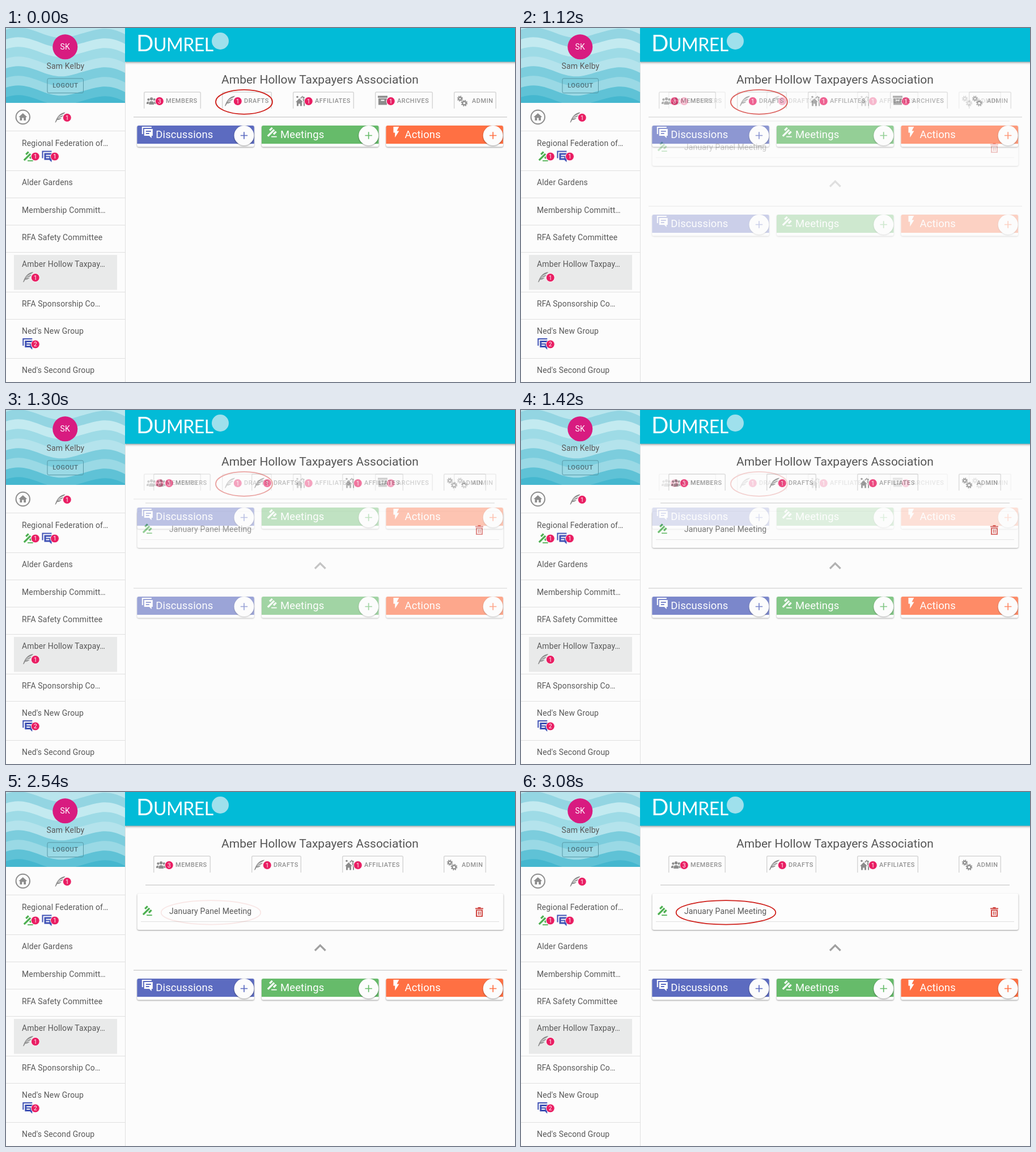
Animation of 898 by 624 pixels, one loop 5080 ms. Source, as an HTML page:

```html
<!DOCTYPE html>
<html lang="en">
<head>
<meta charset="utf-8">
<title>Group drafts</title>
<style>
html, body { margin: 0; width: 100%; height: 100%; overflow: hidden; background: #fcfcfc; }
svg { display: block; width: 898px; height: 624px; font: 14px Roboto, sans-serif; }
text { fill: #595959; letter-spacing: .14px; white-space: pre; }
.mid { text-anchor: middle; }
.caps { font-size: 11px; font-weight: 500; letter-spacing: .5px; fill: #929292; }
.title { font-size: 21px; letter-spacing: 0; fill: #555; }
.head { font-size: 18.5px; letter-spacing: .1px; fill: #fff; }
.count { font-size: 10px; letter-spacing: 0; fill: #fff; text-anchor: middle; }
.brand { font: 40px Lato, sans-serif; letter-spacing: -.5px; fill: #fff; }
.raised { filter: drop-shadow(0 1px 1.2px #0006); }
.ring { fill: none; stroke: #cf211c; stroke-width: 1.8; }
.rule { stroke: #d2d2d2; stroke-width: 1.5; }
.thin { stroke: #e0e0e0; }
</style>
</head>
<body>
<svg id="stage" viewBox="0 0 898 624"></svg>
<script>
const GRAY = '#8c8c8c', INDIGO = '#3f51b5', GREEN = '#4caf50', PINK = '#e91e63';

const text = (x, y, s, cls = '') => `<text x="${x}" y="${y}" class="${cls}">${s}</text>`;
const line = (x1, x2, y, cls) => `<path d="M${x1} ${y}H${x2}" class="${cls}"/>`;
const at = (x, y, body, scale = 1) => `<g transform="translate(${x} ${y}) scale(${scale})">${body}</g>`;
const shape = d => `<path fill-rule="evenodd" d="${d}"/>`;
const dot = (x, y, r) => `<circle cx="${x}" cy="${y}" r="${r}"/>`;
const gear = (x, y, r) => `<g transform="translate(${x} ${y})" fill="none" stroke="${GRAY}">
  <circle r="${r - 1.7}" stroke-width="2"/>
  <circle r="${r}" stroke-width="2" stroke-dasharray="${r * Math.PI / 8}"/></g>`;

// Icons are drawn from their top left corner, about 18 px wide.
const icons = {
  feather: shape(`M0 18C3 9 8 1 18 0C17 2 15 3.5 12.5 4.3C9 5.5 6 8 4.3 11C7 8 11 6 15 5.2
    C14 7 12 8.2 10 8.8C8 9.4 6 10.6 4.7 12.2C7 10.8 9 10.2 11.5 10C9.5 12.6 7 13.6 4 13.6L1.3 18Z`),
  chat: shape('M0 0h17v2H2v11H0zM4 4h15v12h-2v4l-4-4H4zM7 7v2h9V7zM7 11v2h6v-2z'),
  gavel: `<g transform="translate(18.5 0) scale(-.8 .8)">${shape(`M1 21h12v2H1zM5.2 8l2.9-2.8 14.1 14.2-2.8 2.8z
    M12.3 1 18 6.7l-2.8 2.8-5.7-5.7zM3.8 9.5l5.7 5.6-2.8 2.9L1 12.3z`)}</g>`,
  bolt: shape('M0 0v10.5h2.8V19L10 7.6H6L9.8 0z'),
  people: dot(3.4, 4.2, 2.1) + dot(13.8, 4.2, 2.1) + dot(8.6, 3, 2.7) +
    shape('M0 12V10Q0 7.5 4 7.5L3.5 12zM17 12V10Q17 7.5 13 7.5L13.7 12zM4.3 13V10.5Q4.5 7 8.6 7T13 10.5V13z'),
  houses: dot(3, 2, 1.8) + dot(14, 3.4, 1.8) +
    shape('M0 11 6.5 4.5 13 11h-2v7H8v-4H5v4H2v-7zM8 4l4-4 1.2 1.2-4 4zM12 6h4l1.5 5H16v7h-2v-8z'),
  box: shape('M0 0h17v3.5H0zM1 4.5h15V16H1zM5.5 7v2h6V7z'),
  gears: gear(5, 5, 4.2) + gear(12.5, 13, 4.8),
  home: shape('M10 20v-6h4v6h5v-8h3L12 3 2 12h3v8z'),
  trash: shape('M4.5 0h5v1.5H14v2H0v-2h4.5zM1 4.5h12V17H1zM3 6.2v9h8v-9zM4.8 7.5h1.5v6.3H4.8zM7.8 7.5h1.5v6.3H7.8z')
};
const icon = (name, x, y, color = GRAY, scale = 1) => `<g fill="${color}">${at(x, y, icons[name], scale)}</g>`;
const badge = (x, y, n) =>
  `<circle cx="${x}" cy="${y}" r="7.5" fill="${PINK}" stroke="#fff"/>` + text(x, y + 3.6, n, 'count');

const TABS = {
  MEMBERS: [101, 'people', 3],
  DRAFTS: [88, 'feather', 1],
  AFFILIATES: [108, 'houses', 1],
  ARCHIVES: [102, 'box', 1],
  ADMIN: [75, 'gears', 0]
};
function tab(name, x) {
  const [w, glyph, n] = TABS[name];
  return `<path d="M${x + .7} 142V115q0-2 2-2H${x + w - 2.7}q2 0 2 2V142" fill="none" stroke="#d6d6d6" stroke-width="1.5"/>` +
    icon(glyph, x + (n ? 5 : 6), glyph == 'people' ? 122 : 119.5) +
    (n ? badge(x + 27.8, 129, n) : '') + text(x + (n ? 39 : 32), 132, name, 'caps');
}
const tabs = places => Object.entries(places).map(([name, x]) => tab(name, x)).join('');

const card = (x, y, name, glyph, color, dx) => at(x, y, `
  <rect width="206.5" height="37.5" rx="3" fill="#fdfdfd" class="raised"/>
  <path d="M0 32V3q0-3 3-3H203.5q3 0 3 3V32z" fill="${color}"/>
  ${icon(glyph, dx, 2, '#fff')}${text(33, 22, name, 'head')}
  <circle cx="188.7" cy="17.5" r="17.5" fill="#fcfcfc" class="raised"/>
  <path d="M182.5 17.5h12.4M188.7 11.3v12.4" stroke="${color}" stroke-width="1.7"/>`);
const cards = y => card(231.3, y, 'Discussions', 'chat', '#5c6bc0', 8.5) +
  card(451, y, 'Meetings', 'gavel', '#66bb6a', 9) + card(670.5, y, 'Actions', 'bolt', '#ff7043', 13);

const before = tabs({ MEMBERS: 243, DRAFTS: 381, AFFILIATES: 506, ARCHIVES: 651, ADMIN: 790 }) +
  line(225, 884, 157, 'rule') + cards(172) +
  '<ellipse cx="420" cy="130.3" rx="50" ry="21.5" class="ring"/>';

const after = '<path d="M211 60H898V624H211z" fill="#fcfcfc"/>' +
  tabs({ MEMBERS: 260, DRAFTS: 433, AFFILIATES: 593, ADMIN: 772 }) +
  line(246, 862, 164, 'rule') +
  '<rect x="231.5" y="179" width="646" height="64" rx="3" fill="#fdfdfd" class="raised"/>' +
  icon('gavel', 240, 199.5, GREEN) + text(288, 215, 'January Panel Meeting') +
  icon('trash', 828, 203, '#cf4540') + line(238, 870, 228.5, 'thin') +
  '<path d="M545 279.5 554.3 270.3 563.6 279.5" fill="none" stroke="#a0a0a0" stroke-width="3.2"/>' +
  line(225, 884, 314.3, 'rule') + cards(329);

const header = `<rect x="205" y="-5" width="700" height="64.5" fill="#02bbd7" style="filter:drop-shadow(0 1px 2px #0007)"/>` +
  text(230, 41, 'D<tspan font-size="32">UMREL</tspan>', 'brand') +
  '<circle cx="378" cy="23" r="15" fill="#9fe0ec"/>' +
  text(554, 98, 'Amber Hollow Taxpayers Association', 'title mid');

const WATER = ['#b9e5ed', '#93d5e2', '#c3eaf0', '#9edbe6', '#b4e3ec', '#7ccddd', '#9ad9e5', '#5fc2d6', '#45b7cf'];
const waves = WATER.map((color, i) => {
  const y = i * 17 - 14;
  return `<path d="M0 ${y}C45 ${y - 16} 70 ${y + 24} 115 ${y + 12}S175 ${y - 10} 210 ${y + 8}V132H0z" fill="${color}"/>`;
}).join('');

const ROWS = [
  [208, 'Regional Federation of…'], [277, 'Alder Gardens'], [326, 'Membership Committ…'],
  [374, 'RFA Safety Committee'], [421, 'Amber Hollow Taxpay…'], [491, 'RFA Sponsorship Co…'],
  [539, "Ned's New Group"], [608, "Ned's Second Group"]
];
const sidebar = `<path d="M0 0H210V624H0z" fill="#fcfcfc"/><path d="M210.5 60V624" class="thin"/>
  <svg width="210" height="132" viewBox="0 0 210 132"><path d="M0 0H210V132H0z" fill="#a5dde8"/>${waves}</svg>
  <circle cx="104.3" cy="33.3" r="22" fill="#d81b80"/>
  <text x="104.3" y="38.3" class="mid" style="fill:#fff">SK</text>` +
  text(105, 72, 'Sam Kelby', 'mid') +
  `<rect x="73" y="89" width="63.5" height="25.5" rx="2.5" fill="none" stroke="#5797a5"/>
  <text x="104.8" y="105.3" class="caps mid" style="fill:#4d6f78">LOGOUT</text>
  <circle cx="29.8" cy="157" r="12.2" fill="none" stroke="${GRAY}" stroke-width="2"/>` +
  icon('home', 20.8, 148, GRAY, .75) + icon('feather', 86.5, 148.5) + badge(107.8, 158, 1) +
  '<rect x="14" y="400" width="182" height="61.5" fill="#e9eaea"/>' +
  [181.5, 251.5, 299.5, 347.5, 395.5, 465.5, 513.5, 582.5].map(y => line(0, 210, y, 'thin')).join('') +
  ROWS.map(([y, s]) => text(28, y, s)).join('') +
  icon('gavel', 30, 216.5, GREEN) + badge(51.8, 226.5, 1) +
  icon('chat', 63.5, 216.5, INDIGO) + badge(86, 226.5, 1) +
  icon('feather', 30, 430) + badge(51.8, 440, 1) +
  icon('chat', 29.3, 547, INDIGO) + badge(51.8, 557.5, 2);

const stage = document.getElementById('stage');
stage.innerHTML = `${before}<g id="next">${after}</g>${header}${sidebar}
  <ellipse id="mark" cx="361.5" cy="212.4" rx="87.8" ry="21.3" class="ring"/>`;
const next = document.getElementById('next'), mark = document.getElementById('mark');

// Fades advance by a tenth every 60 ms.
const fade = (t, start) => Math.min(10, Math.max(0, Math.floor((t - start) / 60) + 1)) / 10;
const begin = performance.now();
function draw() {
  const t = (performance.now() - begin) % 5080;
  next.setAttribute('opacity', fade(t, 1000));
  mark.setAttribute('opacity', fade(t, 2540));
  requestAnimationFrame(draw);
}
draw();
</script>
</body>
</html>
```
